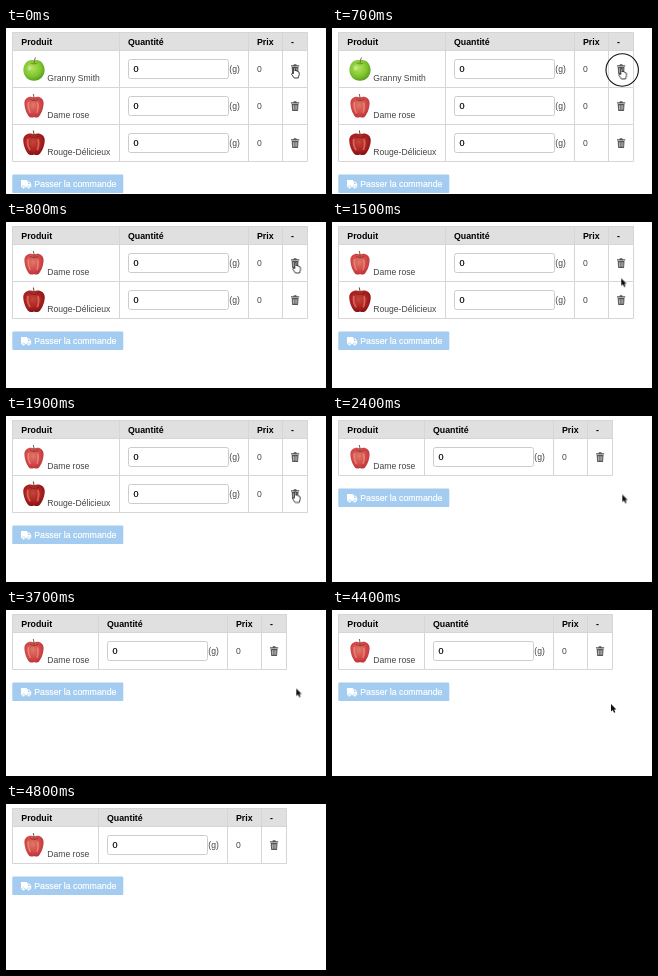
Recreate the animation shown at these times as an HTML page. Size 320 by 166 pixels, loop 5 s.

```html
<!DOCTYPE html>
<html lang="fr">
<head>
<meta charset="utf-8">
<title>Panier</title>
<style>
html, body { margin: 0; width: 100%; height: 100%; overflow: hidden; background: #fff; }
svg { display: block; width: 100vw; height: 100vh; }
text { font: 8.6px "Liberation Sans", Arial, sans-serif; fill: #444; }
.head text { font-weight: bold; font-size: 8.8px; fill: #000; }
.btn text { font-size: 8.75px; fill: #fff; stroke: #fff; stroke-width: .2px; }
.qty { font-size: 9px; fill: #000; stroke: #000; stroke-width: .2px; }
.line { fill: none; stroke: #d6d6d6; }

.row, .shift, .btn, .ring, .pos, .hand, .arrow { animation: 5s step-end infinite; }
.shift { animation-name: shrink; }
.r1 { animation-name: drop1; }
.r2 { animation-name: rise2; }
.r3 { animation-name: rise3; }
.btn { animation-name: riseBtn; }
.ring { animation-name: click; }
.pos { animation-name: travel; }
.hand { animation-name: hand; }
.arrow { animation-name: arrow; }

@keyframes shrink { 0% { transform: none; } 48%, 100% { transform: translateX(-21px); } }
@keyframes drop1 { 0% { visibility: visible; } 16%, 100% { visibility: hidden; } }
@keyframes rise2 {
  0% { transform: translateY(37px); }
  16%, 100% { transform: none; }
}
@keyframes rise3 {
  0% { transform: translateY(74px); visibility: visible; }
  16% { transform: translateY(37px); visibility: visible; }
  48%, 100% { transform: translateY(37px); visibility: hidden; }
}
@keyframes riseBtn {
  0% { transform: translateY(74px); }
  16% { transform: translateY(37px); }
  48%, 100% { transform: none; }
}
@keyframes click {
  0% { visibility: hidden; transform: none; }
  12% { visibility: visible; transform: none; }
  16% { visibility: hidden; transform: none; }
  46% { visibility: visible; transform: translateY(36px); }
  48%, 100% { visibility: hidden; }
}
@keyframes travel {
  0% { transform: translate(289px, 41px); }
  2% { transform: translate(289.6px, 41.5px); }
  4% { transform: translate(290.3px, 42px); }
  24% { transform: translate(290.3px, 42.5px); }
  26% { transform: translate(290px, 44.5px); }
  28% { transform: translate(289.5px, 49px); }
  30% { transform: translate(289.2px, 56.3px); }
  32% { transform: translate(289.2px, 66px); }
  34% { transform: translate(289.7px, 75px); }
  36% { transform: translate(289.9px, 76.5px); }
  38% { transform: translate(290px, 77.5px); }
  40% { transform: translate(290.3px, 78.5px); }
  86% { transform: translate(288px, 83px); }
  88% { transform: translate(279px, 94px); }
  90% { transform: translate(261px, 111px); }
  92% { transform: translate(228px, 134px); }
  94% { transform: translate(181px, 153px); }
  96%, 100% { transform: translate(330px, 180px); }
}
@keyframes hand {
  0%, 34% { visibility: visible; }
  28%, 48%, 100% { visibility: hidden; }
}
@keyframes arrow {
  0%, 34% { visibility: hidden; }
  28%, 48%, 100% { visibility: visible; }
}
</style>
</head>
<body>
<svg viewBox="0 0 320 166" preserveAspectRatio="none">
  <defs>
    <radialGradient id="green" cx=".42" cy=".38" r=".65">
      <stop offset="0" stop-color="#b4e25c"/><stop offset=".6" stop-color="#82c731"/><stop offset="1" stop-color="#549c1c"/>
    </radialGradient>
    <radialGradient id="pink" cx=".45" cy=".4" r=".65">
      <stop offset="0" stop-color="#e27868"/><stop offset=".6" stop-color="#d2484a"/><stop offset="1" stop-color="#b83238"/>
    </radialGradient>
    <radialGradient id="red" cx=".45" cy=".4" r=".65">
      <stop offset="0" stop-color="#c8443c"/><stop offset=".6" stop-color="#ac2020"/><stop offset="1" stop-color="#7c1014"/>
    </radialGradient>

    <g id="round">
      <path d="M28 32.500C33 30.500 38.600 35 38.600 42C38.600 48 34 52.800 28 52.800C22 52.800 17.400 48 17.400 42C17.400 35 23 30.500 28 32.500Z"/>
      <path d="M24.500 35Q28 37.200 31.500 35" fill="none" stroke="#3d7a14" stroke-opacity=".6"/>
      <path d="M28 35.500Q28 32 29.500 29.500" fill="none" stroke="#6b5a2a" stroke-width=".9"/>
      <ellipse cx="23.500" cy="40" rx="2" ry="2.500" fill="#fff" opacity=".35"/>
    </g>
    <g id="tall">
      <path d="M28 32.500C32 30.500 37.800 32.500 37.600 38.500C37.400 44 35 49.500 32.500 52Q30 53 28 52Q26 53 23.500 52C21 49.500 18.600 44 18.400 38.500C18.200 32.500 24 30.500 28 32.500Z"/>
      <path d="M22.500 37Q21.500 43 24.500 48M31.500 37.500Q33 42 31 48" fill="none" stroke="#ffd9b0" stroke-opacity=".35" stroke-width="1.600"/>
      <path d="M24 34.500Q28 37 32 34.500" fill="none" stroke="#5c0c10" stroke-opacity=".45"/>
      <path d="M28 35.500Q28.300 32 27.300 29" fill="none" stroke="#6b4a2a" stroke-width=".9"/>
    </g>

    <g id="trash" fill="#555">
      <path d="M285 37.200h2.400l.6-1h2.200l.6 1h2.400v1.200h-8.200z"/>
      <path d="M285.700 39h6.800l-.4 6.200q-.1.900-1 .9h-4q-.9 0-1-.9z"/>
      <path d="M287.400 40.200v4.600M289.100 40.200v4.600M290.800 40.200v4.600" stroke="#fff" stroke-width=".6"/>
    </g>

    <path id="edge" class="line" d="M6.500 22.500V59.500H93"/>

    <g id="cells">
      <path class="line" d="M85 59.500H301.500V22.500M113.500 22.500V59.500M242.500 22.500V59.500M276.500 22.500V59.500"/>
      <rect x="122.500" y="31.500" width="100" height="19" rx="2" fill="#fff" stroke="#ccc"/>
      <text class="qty" x="127.500" y="44.300">0</text>
      <text x="223.300" y="44">(g)</text>
      <text x="251" y="44">0</text>
      <use href="#trash"/>
    </g>
  </defs>

  <g class="head">
    <path d="M6 4H93V23H6z" fill="#e0e0e0"/>
    <path class="line" d="M93 4.500H6.500V22.500H93"/>
    <text x="15.300" y="16.600">Produit</text>
    <g class="shift">
      <path d="M85 4H302V23H85z" fill="#e0e0e0"/>
      <path class="line" d="M85 4.500H301.500V22.500H85M113.500 4.500V22.500M242.500 4.500V22.500M276.500 4.500V22.500"/>
      <text x="122" y="16.600">Quantité</text>
      <text x="251" y="16.600">Prix</text>
      <text x="285" y="16.600">-</text>
    </g>
  </g>

  <g class="row r3">
    <use href="#edge"/>
    <use href="#tall" fill="url(#red)" transform="translate(28 41) scale(1.12 1.04) translate(-28 -41)"/>
    <text x="41.300" y="53">Rouge-Délicieux</text>
    <g class="shift"><use href="#cells"/></g>
  </g>
  <g class="row r2">
    <use href="#edge"/>
    <use href="#tall" fill="url(#pink)"/>
    <text x="41.300" y="53">Dame rose</text>
    <g class="shift"><use href="#cells"/></g>
  </g>
  <g class="row r1">
    <use href="#edge"/>
    <use href="#round" fill="url(#green)"/>
    <text x="41.300" y="53">Granny Smith</text>
    <use href="#cells"/>
  </g>

  <g class="btn">
    <rect x="6.300" y="72.600" width="111" height="18.500" rx="1.200" fill="#a3ccf0"/>
    <g fill="#fff">
      <path d="M15 78h6.200v1.600h2l2 2.200v3.400H15z"/>
      <path d="M22 80.400h.9l1.300 1.500H22z" fill="#a3ccf0"/>
      <g stroke="#a3ccf0" stroke-width=".6"><circle cx="17.500" cy="85.300" r="1.500"/><circle cx="22.700" cy="85.300" r="1.500"/></g>
    </g>
    <text x="28.200" y="85.100">Passer la commande</text>
  </g>

  <circle class="ring" cx="290.200" cy="42" r="16.200" fill="none" stroke="#111" stroke-width="1.100"/>
  <g class="pos">
    <path class="hand" d="M-1.600 4.500V-1.200Q-.8-2.400 0-1.200V2Q1-.1 1.500 2Q2.600 1.600 2.900 2.800Q4.100 2.500 4.200 3.800V5.800L3.200 9H-.8L-3.500 5.200Q-3.400 3.600-1.600 4.500Z" fill="#fff" stroke="#111" stroke-width=".8" stroke-linejoin="round"/>
    <path class="arrow" d="M0 0V7.600L1.800 6L3 8.800L4.300 8.200L3.100 5.500H5.400Z" fill="#111" stroke="#fff" stroke-width=".5" paint-order="stroke"/>
  </g>
</svg>
</body>
</html>
```
